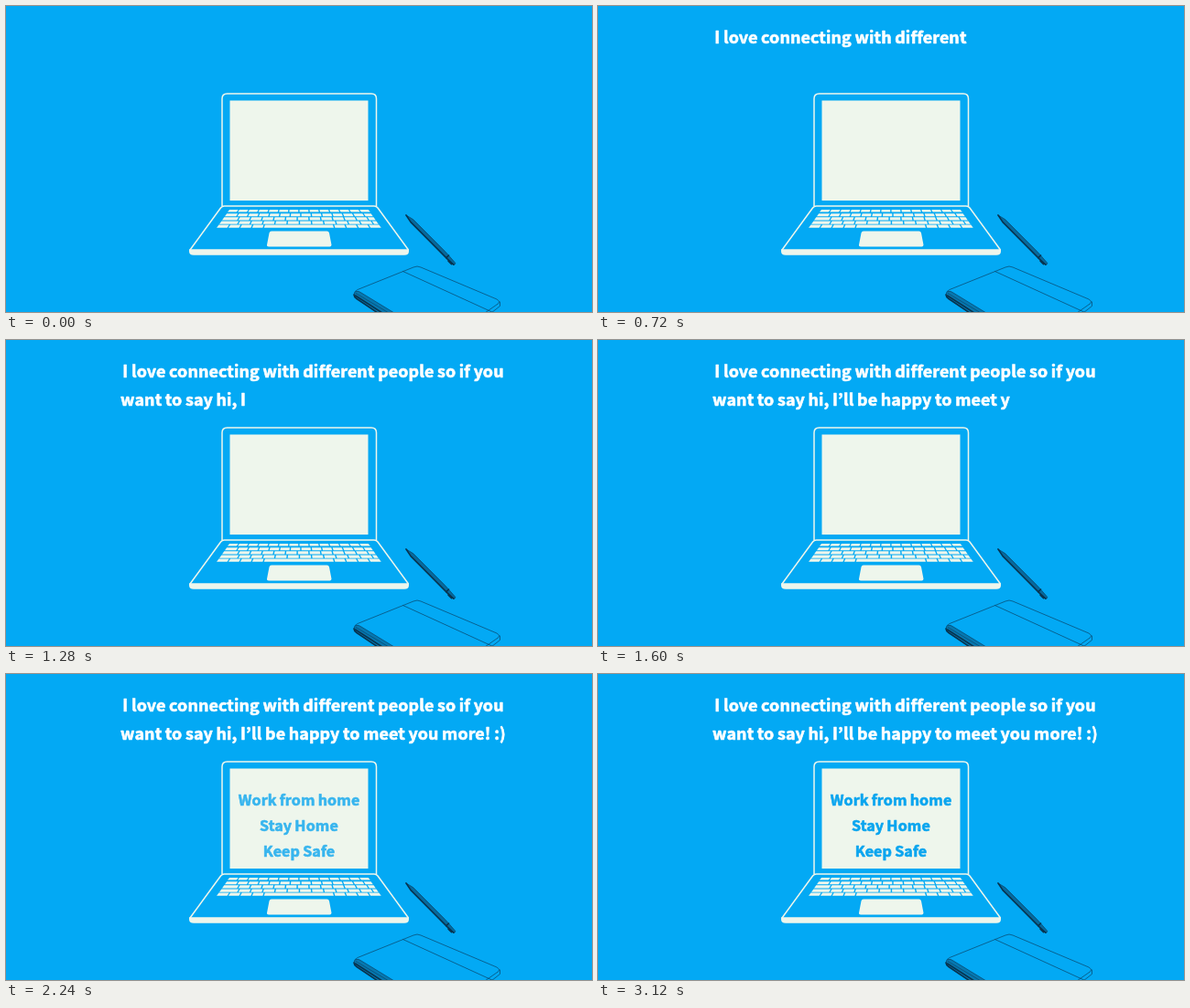
An HTML page that plays this animation: 640x335 px, repeating every 4.24 s.

```html
<!DOCTYPE html>
<html lang="en">
<head>
<meta charset="utf-8">
<title>Work from home</title>
<style>
  html, body { margin: 0; width: 100%; height: 100%; overflow: hidden; background: #03a9f4; }
  svg { display: block; width: 100%; height: 100%; }
  text {
    font-family: "Noto Sans CJK JP", "Noto Sans CJK SC", "Noto Sans CJK", "Noto Sans", sans-serif;
    font-weight: 700; text-anchor: middle; white-space: pre;
    letter-spacing: .1px; word-spacing: -.6px;
    stroke-width: .65px; stroke-linejoin: round;
  }
  .headline { font-size: 17.9px; fill: #fff; stroke: #fff; }
  .rest { fill: none; stroke: none; }
  #message { font-size: 16.1px; fill: #0aa5ef; stroke: #0aa5ef; }
  .line { fill: none; stroke: #eef6ec; stroke-width: 1.5; stroke-linejoin: round; }
  .solid { fill: #eef6ec; }
  .ink { fill: none; stroke: #0a4a70; stroke-width: .75; stroke-linejoin: round; stroke-linecap: round; }
  .heavy { stroke: #073450; stroke-width: 1.6; }
</style>
</head>
<body>
<svg viewBox="0 0 640 335">
  <rect width="640" height="335" fill="#03a9f4"/>

  <g id="laptop">
    <path class="line" d="M236 219V101.500Q236 96 241.500 96H399Q404.500 96 404.500 101.500V219"/>
    <rect class="solid" x="244.500" y="103.500" width="151" height="109.500"/>
    <path class="line" d="M201 267L234.500 221Q236 219 238.500 219H402Q404.500 219 406 221L439.500 267"/>
    <path class="solid" d="M200 266.300H440V268.500Q440 272.800 435 272.800H205Q200 272.800 200 268.500Z"/>
    <path class="solid" d="M290 246.500H350.500Q352.500 246.500 353 248.500L355.500 261.500Q355.500 263.500 353.500 263.500H287Q284.500 263.500 285 261.500L287.500 248.500Q288 246.500 290 246.500Z"/>
    <path class="solid" id="keys"/>
  </g>

  <g id="pen" transform="translate(437 229) rotate(45.200)">
    <path d="M0 0L9 -2.200H58L66 -1.800L75 -1.200Q76.500 0 75 1.400L66 2.200H9Z" fill="#07699c"/>
    <path class="ink" d="M0 0L9 -2.200H58L66 -1.800L75 -1.200Q76.500 0 75 1.400"/>
    <path class="ink heavy" d="M0 0L9 1.800H66L75 1.400M64 -2V2M68 2.600H73"/>
  </g>

  <g id="notebook">
    <path d="M380 316Q380 312 385 312L424 336H405L383 321Q380 319 380 316Z" fill="#0678b0"/>
    <path class="ink" d="M380 316Q380 312 384 310.500L445 286Q449 284 453 286L536 321Q540 323 538 325.500L523 336M539.500 324V328.500L530 336"/>
    <path class="ink" d="M433.500 290.500L533 336M382 312.500Q385 311.500 388 314L424 336M382 314.500L418 336"/>
    <path class="ink heavy" d="M380 316Q380 318.500 383 320.500L406 336M381.500 317L411 336"/>
  </g>

  <text class="headline" x="335.500" y="41"><tspan></tspan><tspan class="rest"></tspan></text>
  <text class="headline" x="335.500" y="72"><tspan></tspan><tspan class="rest"></tspan></text>

  <g id="message" opacity="0">
    <text x="320" y="144">Work from home</text>
    <text x="320" y="172">Stay Home</text>
    <text x="320" y="200">Keep Safe</text>
  </g>
</svg>
<script>
const LOOP = 4240, STEP = 80;
const lines = [
  "I love connecting with different people so if you",
  "want to say hi, I’ll be happy to meet you more! :)"
];
// [time in ms, letters typed]
const typing = [[160, 0], [720, 32], [1280, 66], [1600, 88], [1760, 99]];
const fade = [[1813, 0], [2346, 1]];

const headlines = [...document.querySelectorAll(".headline")];
const message = document.getElementById("message");

function valueAt(points, time) {
  if (time <= points[0][0]) return points[0][1];
  for (let i = 1; i < points.length; i++) {
    const [t0, v0] = points[i - 1], [t1, v1] = points[i];
    if (time <= t1) return v0 + (v1 - v0) * (time - t0) / (t1 - t0);
  }
  return points[points.length - 1][1];
}

// Rows widen towards the front edge; the middle rows are staggered.
function keyRow(row, count) {
  const y = 223 + row * 4.15, h = row ? 3.2 : 2.6;
  const left = 243.5 - row * 2.9, right = 396.5 + row * 2.9;
  const pitch = (right - left) / count;
  const stagger = row % 4 ? pitch * row * .18 : 0;
  const edge = i => i <= 0 ? left : i >= count ? right : left + i * pitch + stagger;
  const lean = x => x + (x - 320) * .028;
  let d = "";
  for (let i = 0; i < count; i++) {
    const hasSpaceBar = row === 4 && i >= 4 && i < 9;
    if (hasSpaceBar && i > 4) continue;
    const x0 = edge(i) + .6, x1 = hasSpaceBar ? 346 : edge(i + 1) - .8;
    d += `M${x0} ${y}H${x1}L${lean(x1)} ${y + h}H${lean(x0)}Z`;
  }
  return d;
}
document.getElementById("keys").setAttribute("d",
  [14, 14, 13, 13, 14].map((count, row) => keyRow(row, count)).join(""));

function draw(time) {
  const now = Math.floor(time % LOOP / STEP) * STEP;
  let typed = Math.floor(valueAt(typing, now) + 1e-6);
  headlines.forEach((el, i) => {
    const [shown, rest] = el.children;
    shown.textContent = lines[i].slice(0, typed);
    rest.textContent = lines[i].slice(typed);
    typed = Math.max(0, typed - lines[i].length);
  });
  message.setAttribute("opacity", valueAt(fade, now));
}

const start = performance.now();
function tick() {
  draw(performance.now() - start);
  requestAnimationFrame(tick);
}
tick();
</script>
</body>
</html>
```
